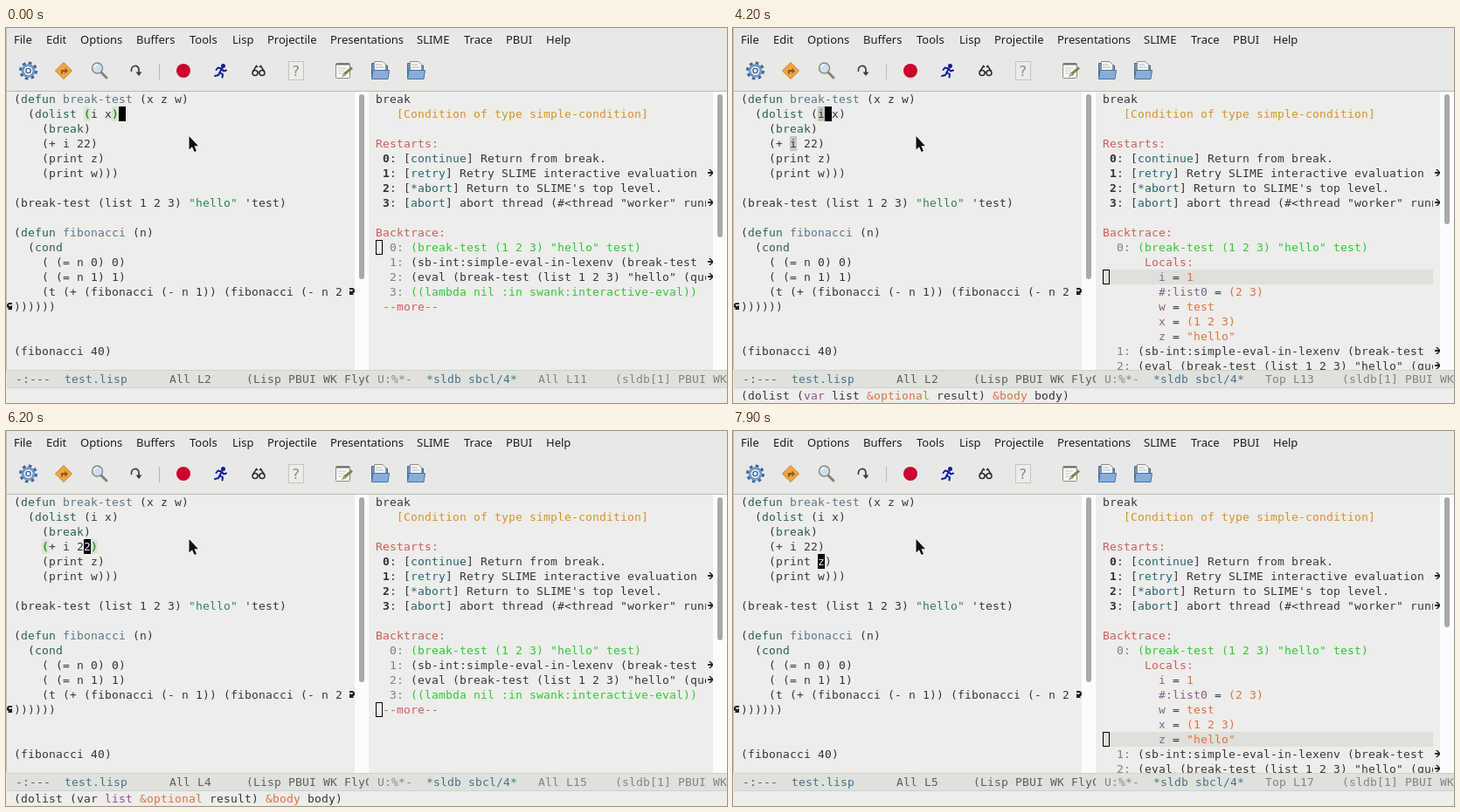
An HTML page with a canvas that plays this animation: 825x430 px, repeating every 8000 ms.

```html
<!DOCTYPE html>
<html lang="en">
<head>
<meta charset="utf-8">
<title>Editor with debugger pane</title>
<style>
  html, body { margin: 0; width: 100%; height: 100%; overflow: hidden; background: #ededeb; }
  canvas, svg { position: absolute; left: 0; top: 0; }
</style>
</head>
<body>
<canvas id="stage" width="825" height="430"></canvas>
<svg width="825" height="430" fill="none">
  <rect width="825" height="72" fill="#e8e8e7"/>
  <path d="M0 72.5H825" stroke="#b9b9b6"/>
  <path d="M.5 0V392" stroke="#c2c2bf"/>
  <path d="M175.5 41V59" stroke="#b8b8b5"/>
  <g id="menu" font-family="'Noto Sans', sans-serif" font-size="13" fill="#1c1c1c"></g>

  <g id="gear" transform="translate(25.5 49)">
    <circle r="9" stroke="#3c66a0" stroke-width="3" stroke-dasharray="3.534"/>
    <circle r="6.5" fill="#e8eef5" stroke="#4a74ac" stroke-width="2.6"/>
    <circle r="6.6" stroke="#9dbbe0"/>
    <circle r="2.6" fill="#f2f5f9" stroke="#3c66a0" stroke-width="1.4"/>
  </g>
  <g id="direction" transform="translate(66 49)">
    <path d="M0-9.5 9.5 0 0 9.5-9.5 0Z" fill="#eda544" stroke="#cf7f1e" stroke-linejoin="round"/>
    <path d="M-3 3.5V-1H1.5V-3.5L5 .2 1.500 3.500V1.200H-1V3.500Z" fill="#8a5a20"/>
  </g>
  <g id="search">
    <path d="M108.5 50.5 115 57" stroke="#85827c" stroke-width="3" stroke-linecap="round"/>
    <circle cx="104.500" cy="46" r="6" fill="#cfdfee" stroke="#858985" stroke-width="1.4"/>
    <path d="M101 45a3.500 3.500 0 0 1 3.500-3" stroke="#fff" stroke-width="1.400"/>
  </g>
  <g id="step">
    <path d="M143.500 50C142 42 152 41.500 152 47.500V51" stroke="#3a3c3c" stroke-width="1.700"/>
    <path d="M148.500 50.500H155.500L152 55Z" fill="#3a3c3c"/>
  </g>
  <circle cx="203" cy="49" r="8" fill="#cc0430"/>
  <g id="runner" stroke="#101c9c" stroke-width="2" stroke-linecap="round" stroke-linejoin="round">
    <circle cx="248.500" cy="43.500" r="1.500" fill="#101c9c"/>
    <path d="M247 46.500 244.500 51M247 46.500 242.500 45.500 240.500 48M247 46.500 249 49.500 252 48.500M244.500 51 248 53 247.500 56.500M244.500 51 243 54 239 55"/>
  </g>
  <g id="glasses" stroke="#2c2c2c" stroke-width="1.500">
    <circle cx="285" cy="51.500" r="3"/><circle cx="293" cy="51.500" r="3"/>
    <path d="M288 51q1-1 2 0M282.500 50 286.500 43.500 288 45M295.500 50 291.500 43.500 290 45"/>
  </g>
  <g id="help">
    <rect x="323.500" y="38.500" width="17" height="21" fill="#ececea" stroke="#c3c3c0"/>
    <text x="327.500" y="55" font-family="'DejaVu Sans', sans-serif" font-size="16" fill="#888">?</text>
  </g>
  <g id="notes">
    <rect x="377.500" y="40.500" width="16" height="17" rx="1" fill="#fbfbf8" stroke="#888c84"/>
    <path d="M378 41.500H393" stroke="#6d7269" stroke-width="2"/>
    <path d="M380 46H389M380 49H387M380 52H386" stroke="#c1c4be"/>
    <path d="M396 45.500 387 53" stroke="#7b8a52" stroke-width="3"/>
    <path d="M388 51 384.500 55.500 389 54Z" fill="#e3bd82" stroke="#6b5a3a" stroke-width=".6"/>
  </g>
  <g id="folder">
    <path d="M418.500 57V40.500H425L427 43H436.500V57Z" fill="#7295ba" stroke="#46688f"/>
    <path d="M421.500 52V38.500H431L434.500 42V52Z" fill="#f6f6f4" stroke="#8b8f8b"/>
    <path d="M423 42H430M423 45H432" stroke="#b5b8b5"/>
    <path d="M418.500 58.500 420 48.500H438.500L437 58.500Z" fill="#86aed8" stroke="#4673a6"/>
  </g>
  <use href="#folder" x="41"/>
  <path d="M209.500 124V139.500L213 136.200 215.600 142 218 140.900 215.500 135.300H220Z" fill="#111" stroke="#fff" stroke-width="1.600" paint-order="stroke"/>
</svg>
<script>
const ctx = document.getElementById('stage').getContext('2d', { alpha: false });
const COL = 8, ROW = 17, TOP = 73, ASCENT = 13, LEFT = 9, RIGHT = 423, LOOP = 8000;
const PAPER = '#ededeb', MARK = '#c6c6bd', MATCH = '#dbe5d6', LINE = '#dee0dc';
const FONT = "13px 'DejaVu Sans Mono', monospace";

// Letters used as {letter:text} in the marked-up lines below.
const COLORS = {
  d: '#363636', k: '#2a5f58', f: '#5d7688', s: '#2f8259', r: '#cd5c5c', w: '#d4922a',
  c: '#27636a', t: '#17707f', g: '#32c832', n: '#7d817e', p: '#85608c', o: '#e2713a',
  B: '#2f3437', a: '#8f5085', m: '#59625b', i: '#7e8681', b: '#48708d'
};

const menu = { File: 9, Edit: 46, Options: 85, Buffers: 149, Tools: 210, Lisp: 259, Projectile: 299,
  Presentations: 371, SLIME: 470, Trace: 524, PBUI: 572, Help: 618 };
document.getElementById('menu').innerHTML =
  Object.entries(menu).map(([label, x]) => `<text x="${x}" y="18">${label}</text>`).join('');

const code = `({k:defun} {f:break-test} (x z w)
  ({k:dolist} (i x)
    ({k:break})
    (+ i 22)
    (print z)
    (print w)))

(break-test (list 1 2 3) {s:"hello"} 'test)

({k:defun} {f:fibonacci} (n)
  ({k:cond}
    ( (= n 0) 0)
    ( (= n 1) 1)
    (t (+ (fibonacci (- n 1)) (fibonacci (- n 2
))))))


(fibonacci 40)`.split('\n');
const plainCode = code.map(line => line.replace(/\{\w:(.*?)\}/g, '$1'));

const header = `break
   {w:[Condition of type simple-condition]}

{r:Restarts:}
 {B:0}: [{c:continue}] Return from break.
 {B:1}: [{t:retry}] Retry SLIME interactive evaluation
 {B:2}: [{c:*abort}] Return to SLIME's top level.
 {B:3}: [{c:abort}] abort thread (#<thread "worker" running

{r:Backtrace:}
  {n:0:} {g:(break-test (1 2 3) "hello" test)}`.split('\n');
const locals = `      {r:Locals:}
        {p:i} = {o:1}
        {p:#:list0} = {o:(2 3)}
        {p:w} = {o:test}
        {p:x} = {o:(1 2 3)}
        {p:z} = {o:"hello"}`.split('\n');
const frames = `  {n:1:} (sb-int:simple-eval-in-lexenv (break-test
  {n:2:} (eval (break-test (list 1 2 3) "hello" (quote
  {n:3:} {g:((lambda nil :in swank:interactive-eval))}
 {r:--more--}`.split('\n');

// Cells are [column, row]; each step changes only what it names.
const steps = [
  [0, { cursor: [15, 1], match: [[10, 1], [14, 1]], marks: [], open: false, line: 11, arg: '' }],
  [600, { cursor: [14, 1] }],
  [700, { match: [] }],
  [1000, { cursor: [13, 1] }],
  [1500, { marks: [[19, 0], [13, 1]] }],
  [1600, { arg: 'list' }],
  [2900, { cursor: [11, 1], marks: [], open: true, line: 13 }],
  [3500, { marks: [[11, 1], [7, 3]], arg: 'var' }],
  [4200, { cursor: [12, 1] }],
  [4500, { cursor: [13, 1], marks: [], line: 16 }],
  [5000, { arg: '' }],
  [5100, { marks: [[19, 0], [13, 1]], arg: 'list' }],
  [5400, { cursor: [11, 2], marks: [] }],
  [5500, { match: [[4, 2], [10, 2]] }],
  [5600, { cursor: [12, 3] }],
  [5700, { match: [[4, 3], [11, 3]] }],
  [6200, { cursor: [10, 3], open: false, line: 15 }],
  [6300, { cursor: [9, 3] }],
  [6500, { cursor: [8, 3], match: [], open: true, line: 13 }],
  [6700, { cursor: [7, 3] }],
  [7200, { marks: [[7, 3], [11, 1]], arg: '' }],
  [7300, { cursor: [7, 4], marks: [], open: false, line: 15 }],
  [7400, { cursor: [8, 4] }],
  [7600, { cursor: [9, 4] }],
  [7700, { cursor: [10, 4] }],
  [7900, { cursor: [11, 4], open: true, line: 17 }]
];

// Fringe indicators, each 8 by 8.
const CURL_RIGHT = new Path2D('M2 0H6L8 2V5L6 6.500 7 8H2V3L4 4H5L6 2H2Z');
const CURL_LEFT = new Path2D('M6 0H2L0 2V5L2 6.500 1 8H6V3L4 4H3L2 2H6Z');
const CUT_OFF = new Path2D('M3 0H5L8 3V5L5 8H3L6 5H2V3H6Z');

function rect(x, y, w, h, color) {
  ctx.fillStyle = color;
  ctx.fillRect(x, y, w, h);
}

function glyphs(text, x, baseline, color, bold) {
  ctx.font = (bold ? 'bold ' : '') + FONT;
  ctx.fillStyle = color;
  [...text].forEach((ch, i) => ch !== ' ' && ctx.fillText(ch, x + i * COL, baseline));
}

function write(markup, x, baseline, base = 'd') {
  for (const [part, key, inner] of markup.matchAll(/\{(\w):(.*?)\}|[^{]+/g)) {
    const text = inner ?? part;
    glyphs(text, x, baseline, COLORS[key || base], key === 'B');
    x += text.length * COL;
  }
}

function writeRows(lines, x) {
  lines.forEach((line, row) => write(line, x, TOP + row * ROW + ASCENT));
}

function clipped(x, y, w, h, draw) {
  ctx.save();
  ctx.beginPath();
  ctx.rect(x, y, w, h);
  ctx.clip();
  draw();
  ctx.restore();
}

function cell([col, row], background, color, bold) {
  const x = LEFT + col * COL, y = TOP + row * ROW;
  rect(x, y, COL, ROW, background);
  glyphs(plainCode[row][col] || ' ', x, y + ASCENT, color, bold);
}

function fringe(shape, x, row) {
  ctx.save();
  ctx.translate(x, TOP + row * ROW + 4);
  ctx.fillStyle = '#222';
  ctx.fill(shape);
  ctx.restore();
}

function scrollbar(x, height) {
  rect(x, TOP, 16, 319, '#fcfcfc');
  ctx.fillStyle = '#a9a9a7';
  ctx.beginPath();
  ctx.roundRect(x + 5, 76, 6, height, 3);
  ctx.fill();
}

function drawCode({ cursor, match, marks }) {
  writeRows(code, LEFT);
  marks.forEach(at => cell(at, MARK, COLORS.d));
  match.forEach(at => cell(at, MATCH, '#22a02c', true));
  const under = cells => cells.some(at => at + '' === cursor + '');
  cell(cursor, '#000', under(marks) ? MARK : under(match) ? MATCH : PAPER);
  fringe(CURL_RIGHT, 391, 13);
  fringe(CURL_LEFT, 1, 14);
  scrollbar(399, 212);
}

function drawDebugger({ open, line }) {
  const lines = [...header, ...(open ? locals : []), ...frames];
  const y = TOP + (line - 1) * ROW;
  if (open) rect(RIGHT, y, 378, ROW, LINE);
  clipped(415, TOP, 386, 319, () => writeRows(lines, RIGHT));
  ctx.strokeStyle = '#000';
  ctx.lineWidth = 1;
  ctx.strokeRect(RIGHT + .5, y + .5, COL - 1, ROW - 1);
  const firstFrame = lines.indexOf(frames[0]);
  for (const row of [5, 7, firstFrame, firstFrame + 1]) fringe(CUT_OFF, 801, row);
  scrollbar(809, open ? 149 : 164);
}

function modeLine(x, width, markup, base) {
  clipped(x, 392, width, 21, () => {
    rect(x, 392, width, 21, '#d0d3cc');
    rect(x, 393, width, 19, '#dfe1dc');
    write(markup, x + 2, 407, base);
  });
}

function draw(state) {
  rect(0, 0, 825, 430, PAPER);
  clipped(0, TOP, 825, 319, () => {
    drawCode(state);
    drawDebugger(state);
  });
  modeLine(1, 414, ` -:---  {b:test.lisp}      All L${state.cursor[1] + 1}     (Lisp PBUI WK FlyC`, 'm');
  modeLine(415, 410, ` U:%*-  {b:*sldb sbcl/4*}   ${state.open ? 'Top' : 'All'} L${state.line}    (sldb[1] PBUI WK`, 'i');
  if (state.arg) {
    const args = 'var list'.replace(state.arg, '{a:$&}');
    write(`(dolist (${args} {o:&optional} result) {o:&body} body)`, LEFT, 426);
  }
}

let shown = 0;
function tick() {
  const time = performance.now() % LOOP;
  const past = steps.filter(([start]) => start <= time);
  if (past.length !== shown) {
    shown = past.length;
    draw(Object.assign({}, ...past.map(([, change]) => change)));
  }
  requestAnimationFrame(tick);
}
tick();
</script>
</body>
</html>
```
